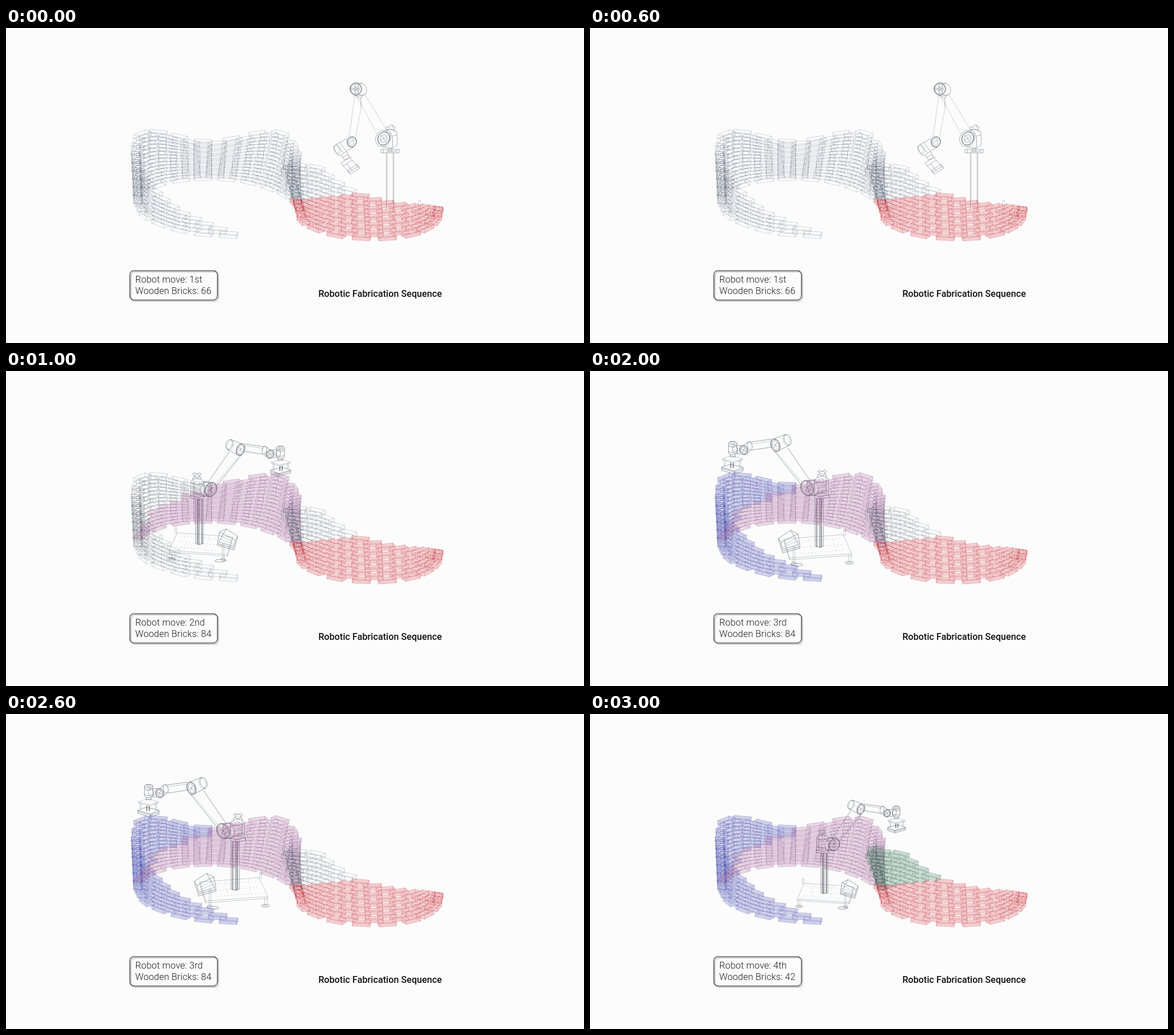
These frames come from a looping animation (1013 px wide and 553 px high, 4000 ms). An HTML page:

```html
<!DOCTYPE html>
<html lang="en">
<head>
<meta charset="utf-8">
<title>Robotic Fabrication Sequence</title>
<style>
  html, body { margin: 0; width: 100%; height: 100%; overflow: hidden; background: #fcfcfc; }
  svg { display: block; width: 100vw; height: 100vh; }
  text { font-family: Roboto, "Open Sans", sans-serif; font-size: 16.2px; fill: #1d1d1f; }
  .label { font-weight: 300; letter-spacing: .12px; }
  .title { font-weight: 500; fill: #111; }
  .robot { fill: none; stroke: #4d5663; stroke-width: .55; stroke-linejoin: round; }
  .robot * { vector-effect: non-scaling-stroke; }
  .robot .soft { stroke-opacity: .55; }
  .robot .dark { stroke: #2c333d; stroke-width: .9; }
  .robot .dots { stroke-dasharray: 1 5; stroke-width: .8; stroke-opacity: .6; }
  .edges { fill: none; stroke-width: .5; stroke-opacity: .5; stroke-linejoin: round; }
</style>
</head>
<body>
<svg viewBox="0 0 1013 553" xmlns="http://www.w3.org/2000/svg">
  <rect width="1013" height="553" fill="#fcfcfc"/>
  <g id="robots"></g>
  <g id="wall"></g>
  <g fill="none">
    <rect x="219" y="428" width="153.5" height="51.5" rx="7" stroke="#777" stroke-width=".8"/>
    <rect x="217" y="426" width="153.5" height="51.5" rx="7" stroke="#1d1d1f" stroke-width="1.1"/>
  </g>
  <text id="move" class="label" x="226.6" y="447"></text>
  <text id="count" class="label" x="226.6" y="467"></text>
  <text class="title" x="547.4" y="472">Robotic Fabrication Sequence</text>
</svg>
<script>
const $ = id => document.getElementById(id);

// Plan curves of the lowest and highest course, one point per brick.
const low = [
  [390, 363], [347, 360], [306, 353], [271, 342], [246, 329], [235, 314], [231, 300],
  [239, 287], [265, 274], [305, 265], [345, 262], [387, 263], [428, 269], [462, 279],
  [489, 291], [508, 307], [516, 323], [521, 338], [543, 351], [579, 362], [623, 367],
  [668, 367], [710, 361], [736, 351], [753, 338], [758, 324]];
const high = [
  [390, 268], [347, 262], [308, 262], [276, 248], [251, 235], [231, 217], [227, 201],
  [239, 188], [266, 185], [302, 193], [345, 201], [397, 197], [442, 187], [480, 187],
  [502, 206], [509, 226], [494, 241], [510, 243], [543, 247], [577, 258], [619, 268],
  [663, 266], [708, 256], [744, 240], [758, 228], [761, 218]];

const courses = 15, lastBrick = 25;
const tilt = .35;                       // ground depth to screen height
const half = { length: 15.5, width: 7, height: 3.4 };
const lerp = (a, b, t) => a + (b - a) * t;

function spline(points, u) {
  const i = Math.min(Math.floor(u), points.length - 2), t = u - i;
  const p = n => points[Math.max(0, Math.min(points.length - 1, n))];
  return [0, 1].map(c => {
    const a = p(i - 1)[c], b = p(i)[c], d = p(i + 1)[c], e = p(i + 2)[c];
    return b + t / 2 * (d - a + t * (2 * a - 5 * b + 4 * d - e + t * (3 * (b - d) + e - a)));
  });
}

function pointOn(course, u) {
  const a = spline(low, u), b = spline(high, u), t = course / (courses - 1);
  return [lerp(a[0], b[0], t), lerp(a[1], b[1], t)];
}

function brickCorners(course, u) {
  const [x, y] = pointOn(course, u);
  const a = pointOn(course, Math.max(0, u - .2)), b = pointOn(course, Math.min(lastBrick, u + .2));
  const dx = b[0] - a[0], dy = (b[1] - a[1]) / tilt, d = Math.hypot(dx, dy) || 1;
  const tx = dx / d, ty = dy / d;
  const corner = (l, w, h) => [
    x + tx * l * half.length - ty * w * half.width,
    y + (ty * l * half.length + tx * w * half.width) * tilt + h * half.height];
  return [-1, 1].flatMap(h =>
    [[-1, -1], [1, -1], [1, 1], [-1, 1]].map(([l, w]) => corner(l, w, h)));
}

function hull(points) {
  const sorted = [...points].sort((a, b) => a[0] - b[0] || a[1] - b[1]);
  const chain = list => {
    const out = [];
    for (const p of list) {
      while (out.length > 1) {
        const [a, b] = out.slice(-2);
        if ((b[0] - a[0]) * (p[1] - a[1]) - (b[1] - a[1]) * (p[0] - a[0]) > 0) break;
        out.pop();
      }
      out.push(p);
    }
    return out.slice(0, -1);
  };
  return [...chain(sorted), ...chain(sorted.reverse())];
}

const xy = p => p.map(v => v.toFixed(1)).join(' ');
const loop = points => 'M' + points.map(xy).join('L') + 'Z';
const edges = c => loop(c.slice(0, 4)) + loop(c.slice(4)) +
  [0, 1, 2, 3].map(i => `M${xy(c[i])}L${xy(c[i + 4])}`).join('');

const zones = [
  { name: 'red', step: 0, fill: '#d43a44', stroke: '#c02c3a', tint: .23 },
  { name: 'purple', step: 1, fill: '#a0528e', stroke: '#8a5a90', tint: .21 },
  { name: 'blue', step: 2, fill: '#4a4cae', stroke: '#3d46a8', tint: .24 },
  { name: 'green', step: 3, fill: '#3f8062', stroke: '#2c6048', tint: .26 }];

function zoneOf(course, u) {
  if (u < 6.8 + .28 * course) return 'blue';
  if (course <= 10 && u >= 15 + course / 2) return 'red';
  return u < 15.2 ? 'purple' : 'green';
}

// Each course starts and ends half a brick further in than the one below.
const bricks = {};
for (let course = 0; course < courses; course++)
  for (let u = course / 2; u <= lastBrick - course / 2; u++)
    (bricks[zoneOf(course, u)] ||= []).push(brickCorners(course, u));

$('wall').innerHTML = ['blue', 'purple', 'green', 'red'].map(name => {
  const zone = zones.find(z => z.name === name);
  return `<path id="${name}Fill" fill="${zone.fill}" fill-opacity="${zone.tint}"
      d="${bricks[name].map(c => loop(hull(c))).join('')}"/>
    <g id="${name}Edges" class="edges">${
      bricks[name].map(c => `<path d="${edges(c)}"/>`).join('')}</g>`;
}).join('');

const line = (d, cls = '') => `<path class="${cls}" d="${d}"/>`;
const oval = (x, y, rx, ry = rx, turn = 0, cls = '') =>
  `<ellipse class="${cls}" cx="${x}" cy="${y}" rx="${rx}" ry="${ry}" transform="rotate(${turn} ${x} ${y})"/>`;

const hangingArm =
  line('M666.5 219V318M679.5 219V318') + line('M668.5 219V306M678 219V306', 'soft') +
  line('M657 213H689V219H657ZM661 213V219M667 216H684M671 210V219M676 210V219M685 213V219') +
  line('M723 318V303H727V318', 'soft') +
  oval(661, 194, 13, 15, 25) + oval(662, 194, 10, 12, 25, 'dark') +
  oval(662, 194, 6, 7, 25) + line('M656 198L668 189M658 188L666 200') +
  line('M665 180Q675 175 685 182L686 204Q682 211 671 211L660 208M672 181Q680 190 677 210M685 188L677 190') +
  line('M666 178L667 173L671 175L674 170L678 170L677 174L682 173L681 178ZM669 178V182M680 178V182') +
  line('M615 120L650 186M628 115L665 176', 'soft') +
  oval(624, 108, 8, 11, -10) + oval(613, 107, 10, 10.5, 0, 'dark') + oval(612, 107, 7.5, 8) +
  oval(612, 107, 3.5) + line('M612 97L625 97M611 118L624 119M605 107H619M612 100V114') +
  line('M611 119L601 194M623 136L612 196', 'soft') + line('M611 119L622 123L628 114M622 123V138') +
  oval(606, 200, 8, 9, 20, 'dark') + oval(605, 200, 5, 6, 20) + line('M601 203L610 196') +
  line('M598 194L581 203Q573 207 575 214L580 222L586 224L600 214L609 209M580 204L591 219M585 201L596 216') +
  oval(580, 213, 4, 8, -30) +
  line('M588 224L594 232L602 227L597 217M590 228L599 222') +
  line('M587 237L603 227L607 232L591 242ZM591 242L602 255M607 232L617 245M597 238L607 251') +
  line('M599 249L616 239L620 246L603 257ZM601 253L618 243');

const pedestalArm =
  line('M300 284L397 291L388 322L286 315ZM286 315V318L388 325V322M388 325L397 294V291', 'soft') +
  line('M306 290L384 296M303 300L380 306M300 309L372 315M318 287L312 313M356 291L349 317', 'dots') +
  line('M332.5 225V303L337 305L346 303V225') +
  line('M335.5 225V304M338 225V305M343.5 225V304', 'dark') + line('M341 225V304', 'soft') +
  line('M323 219L332 216L347 219V223L338 226L323 223ZM323 219L338 222L347 219M338 222V226') +
  line('M324 217V194Q326 189 335 189Q344 190 347 195V219M324 196Q336 202 347 196M328 192V216M324 212L345 216') +
  line('M328 190V186L331 184L327 181L330 178L334 181L339 179L342 181L338 184L342 187V190M330 186Q335 189 340 186') +
  oval(334, 183, 4, 2, 0, 'soft') +
  line('M345 194L357 196M345 220L356 220M338 196L349 202') +
  oval(359, 208, 10, 13, 25, 'dark') + oval(359, 208, 8, 11, 25) +
  oval(359, 208, 5, 7, 25, 'soft') + oval(350, 207, 9, 13, 20) + line('M354 211L364 204M356 203L362 213') +
  line('M354 196L391 142M369 202L413 147') + line('M366 200L410 148', 'soft') +
  oval(391, 129, 5.5, 9, 20) + oval(393, 130, 5.5, 9, 20, 'soft') +
  oval(411, 138, 7, 10.5, 20, 'dark') + oval(411, 138, 5, 8, 20) +
  line('M394 120L414 128M388 138L408 148M408 141L414 135M409 134L413 142') +
  line('M417 128L454 133M417 141L450 146') + line('M417 131L452 136', 'soft') +
  oval(453, 139, 4, 7, 12) + line('M454 132L463 138M451 146L459 152') +
  oval(463, 146, 6.5, 7.5, 20, 'dark') + oval(463, 146, 4.5, 5.5, 20) + line('M459 148L467 144M461 142L465 150') +
  line('M466 139L474 138M468 152L474 152') +
  oval(481, 134.5, 7, 3) + oval(481, 133.5, 4, 1.6) +
  line('M474 135V151Q481 156 488 151V135M474 139Q481 143 488 139M474 148Q481 152 488 148') +
  oval(477, 145, 4, 7, 10) +
  line('M477 153V158M485 153V158M477 156Q481 158 485 156') +
  line('M465 160L484 155L498 160L479 165ZM465 160V162L479 167L498 162V160', 'soft') +
  line('M468 162V174M470 162V174M495 162V172M493 162V172M480 166V176M484 165V176', 'soft') +
  line('M480 167V175M484 167V175', 'dark') +
  line('M464 174L485 169L499 174L478 180ZM464 174V180L478 185L499 179V174M478 180V185') +
  line('M464 177L478 182L499 176') +
  line('M386 277L406 290L405 295L399 314L371 306V300L374 283ZM386 277L381 286L402 297L406 290M374 283L381 286L373 300L399 308L402 297M371 303L399 311') +
  line('M377 290L397 300M375 295L398 304', 'soft') +
  line('M296 286V275Q297.5 273 299 275V286M379 329V304Q380.5 302 382 304V329M287 317V328M291 317V328', 'soft') +
  oval(376, 333, 10, 2.3, -2) + oval(381, 331, 4, 2) + oval(290, 330, 7, 2) + oval(290, 329, 3, 1.5, 0, 'soft');

const placements = ['', 'translate(764.7 -18) scale(-1.07 1.075)', 'translate(108.8 44.2) scale(.89)'];
$('robots').innerHTML =
  `<g class="robot" style="stroke:#6c6f76">${hangingArm}</g>` +
  placements.map(t => `<g class="robot" transform="${t}">${pedestalArm}</g>`).join('');

const steps = [['1st', 66], ['2nd', 84], ['3rd', 84], ['4th', 42]];
let shown = -1;

function show(step) {
  [...$('robots').children].forEach((robot, i) => {
    robot.style.display = i === step ? '' : 'none';
  });
  for (const zone of zones) {
    const built = zone.step <= step;
    $(zone.name + 'Fill').style.display = built ? '' : 'none';
    $(zone.name + 'Edges').style.stroke = built ? zone.stroke : step ? '#59626b' : '#5c697d';
  }
  $('move').textContent = 'Robot move: ' + steps[step][0];
  $('count').textContent = 'Wooden Bricks: ' + steps[step][1];
}

const start = performance.now();
function tick() {
  const step = Math.floor((performance.now() - start) / 1000) % steps.length;
  if (step !== shown) show(shown = step);
  requestAnimationFrame(tick);
}
tick();
</script>
</body>
</html>
```
